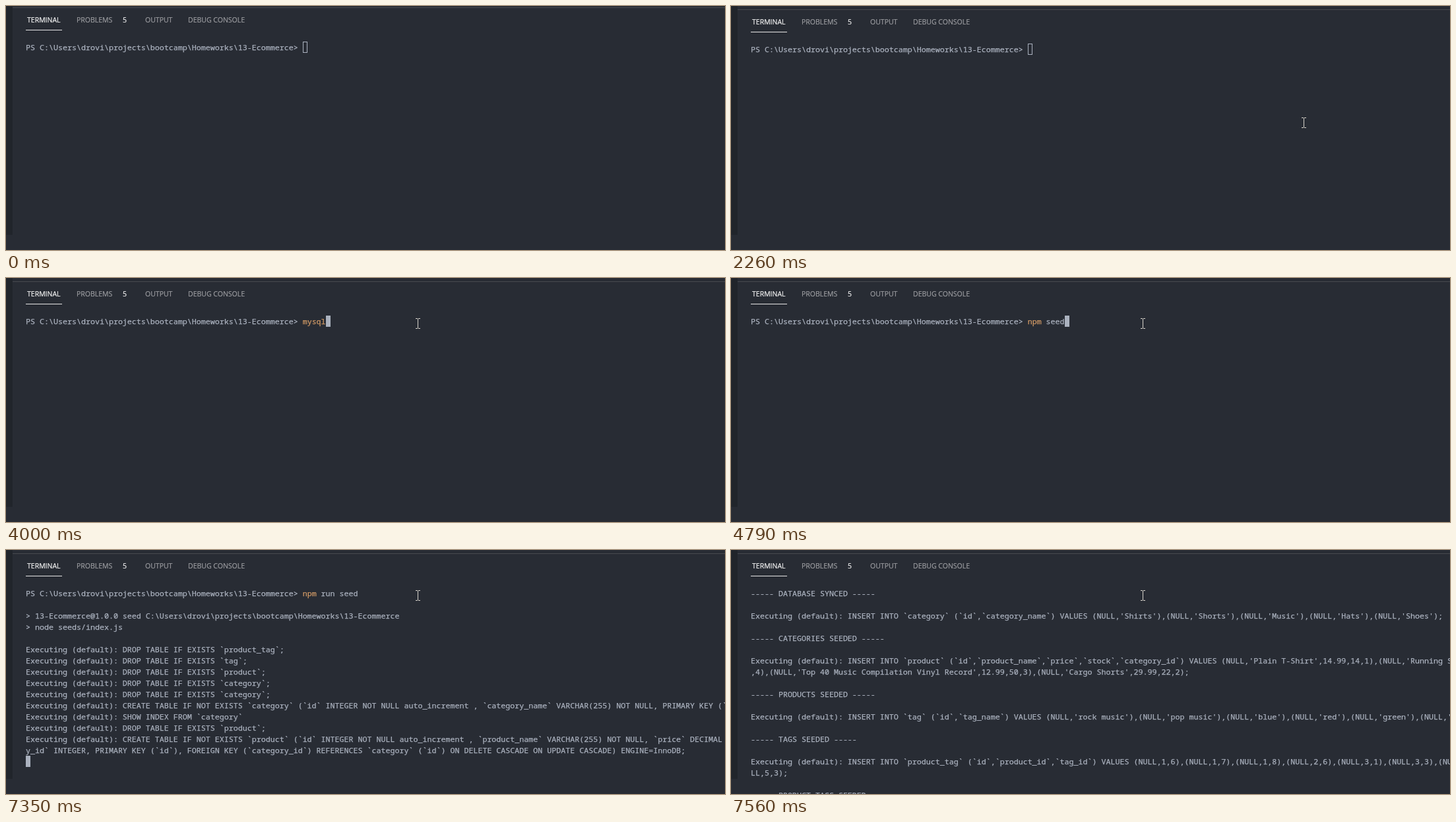
Write an HTML page that moves like this. It is 1090 px wide and 370 px high and loops after 8000 ms.

```html
<!DOCTYPE html>
<html lang="en">
<head>
<meta charset="utf-8">
<title>Terminal</title>
<style>
  html, body { margin: 0; width: 100%; height: 100%; overflow: hidden; background: #282c34; }
  #stage { position: relative; width: 1090px; height: 370px; overflow: hidden; background: #282c34; }
  #stage div, #mouse { position: absolute; }
  #strip { left: 0; top: 0; width: 10px; height: 347px; background: #21252b; }
  #panel { left: 0; top: 0; width: 1090px; height: 500px; }
  #edge { left: 10px; top: 2px; width: 1080px; height: 1px; background: #47494f; }
  #line { left: 30px; top: 36px; width: 55px; height: 1px; background: #e7e7e7; }
  .tab { top: 14px; font: 10.5px/14px "Open Sans", "Noto Sans", sans-serif; color: #9b9ca0; white-space: pre;
         -webkit-text-stroke: .2px; }
  .on { color: #f4f4f4; }
  #term { left: 30px; top: 54px; }
  #text { left: 0; top: 0; font: 11.6667px/17px "Noto Sans Mono", monospace; font-variant-ligatures: none;
          color: #abb2bf; white-space: pre; -webkit-text-stroke: .25px; }
  #text b { font-weight: normal; color: #d19a66; }
  #caret { box-sizing: border-box; width: 7px; height: 17px; border: 1px solid #abb2bf; }
  #mouse { left: 0; top: 0; }
</style>
</head>
<body>
<div id="stage">
  <div id="strip"></div>
  <div id="panel">
    <div id="edge"></div>
    <div class="tab on" style="left:32px">TERMINAL</div>
    <div class="tab" style="left:107px">PROBLEMS</div>
    <div class="tab on" style="left:177px">5</div>
    <div class="tab" style="left:211px">OUTPUT</div>
    <div class="tab" style="left:276px">DEBUG CONSOLE</div>
    <div id="line"></div>
    <div id="term"><div id="text"></div><div id="caret"></div></div>
  </div>
  <svg id="mouse" width="7" height="16" fill="none" stroke="#d7d3cb" shape-rendering="crispEdges">
    <path d="M0 .5h3m1 0h3M3.5 1v14M0 15.5h3m1 0h3"/>
  </svg>
</div>
<script>
const LOOP = 8000, ROWS = 21, CELL = 7, LINE = 17;
const $ = id => document.getElementById(id);

const dir = 'C:\\Users\\drovi\\projects\\bootcamp\\Homeworks\\13-Ecommerce';
const prompt = `PS ${dir}> `;
const run = sql => 'Executing (default): ' + sql;
const drop = name => run(`DROP TABLE IF EXISTS \`${name}\`;`);
const create = (name, cols) =>
  run(`CREATE TABLE IF NOT EXISTS \`${name}\` (\`id\` INTEGER NOT NULL auto_increment , ${cols}`);
const show = name => run(`SHOW INDEX FROM \`${name}\``);
const insert = (name, cols, values) =>
  run(`INSERT INTO \`${name}\` (${['id', ...cols].map(c => `\`${c}\``).join()}) VALUES (NULL,${values}`);
const done = what => ['', `----- ${what} -----`, ''];
const list = names => names.map(n => `'${n}'`).join('),(NULL,') + ');';

// Output rows below the first prompt, wrapped as the terminal wraps them
const log = [
  '',
  `> 13-Ecommerce@1.0.0 seed ${dir}`,
  '> node seeds/index.js',
  '',
  ...['product_tag', 'tag', 'product', 'category', 'category'].map(drop),
  create('category', '`category_name` VARCHAR(255) NOT NULL, PRIMARY KEY (`id`)) ENGINE=InnoDB;'),
  show('category'),
  drop('product'),
  create('product', '`product_name` VARCHAR(255) NOT NULL, `price` DECIMAL NOT NULL, `stock` INTEGER NOT NULL, `categor'),
  'y_id` INTEGER, PRIMARY KEY (`id`), FOREIGN KEY (`category_id`) REFERENCES `category` (`id`) ON DELETE CASCADE ON UPDATE CASCADE) ENGINE=InnoDB;',
  show('product'),
  drop('tag'),
  create('tag', '`tag_name` VARCHAR(255), PRIMARY KEY (`id`)) ENGINE=InnoDB;'),
  show('tag'),
  drop('product_tag'),
  create('product_tag', '`product_id` INTEGER, `tag_id` INTEGER, UNIQUE `product_tag_unique` (`product_id`, `tag_id`), PRIMARY KEY (`id`), FOR'),
  'EIGN KEY (`product_id`) REFERENCES `product` (`id`) ON DELETE CASCADE ON UPDATE CASCADE) ENGINE=InnoDB;',
  show('product_tag'),
  ...done('DATABASE SYNCED'),
  insert('category', ['category_name'], list(['Shirts', 'Shorts', 'Music', 'Hats', 'Shoes'])),
  ...done('CATEGORIES SEEDED'),
  insert('product', ['product_name', 'price', 'stock', 'category_id'],
    "'Plain T-Shirt',14.99,14,1),(NULL,'Running Sneakers',90,25,5),(NULL,'Baseball Hat',22.99,12"),
  ",4),(NULL,'Top 40 Music Compilation Vinyl Record',12.99,50,3),(NULL,'Cargo Shorts',29.99,22,2);",
  ...done('PRODUCTS SEEDED'),
  insert('tag', ['tag_name'], list(['rock music', 'pop music', 'blue', 'red', 'green', 'white', 'gold'])),
  ...done('TAGS SEEDED'),
  insert('product_tag', ['product_id', 'tag_id'],
    '1,6),(NULL,1,7),(NULL,1,8),(NULL,2,6),(NULL,3,1),(NULL,3,3),(NULL,3,4),(NULL,3,5),(NU'),
  'LL,5,3);',
  ...done('PRODUCT TAGS SEEDED')
];

// Step tables: [start ms, value...]
const shifts = [[0, 0], [1060, 1], [1190, 2], [1320, 3]];
const commands = [[0, ''], [4000, 'mysql'], [4330, 'npm start'], [4460, 'npm run seed'],
  [4790, 'npm seed'], [5210, 'npm run seed']];
const caretRows = [[0, 0], [6070, 1], [6730, 5], [7280, 9], [7350, 15], [7420, 23], [7490, 35], [7560, 44]];
const focus = [[0, false], [3270, true]];
const pointer = [[0], [130, 1065, 308], [200], [2260, 865, 169], [2330, 800, 130], [2400, 735, 96],
  [2480, 672, 64], [2550, 628, 45], [2620, 608, 39], [2690, 618, 52], [2810, 630, 67],
  [3070, 622, 60], [3140, 620, 53], [3200, 621, 58], [3340, 621, 61]];

const stepAt = (steps, t) => steps.findLast(s => s[0] <= t);
const at = (steps, t) => stepAt(steps, t)[1];
const escape = s => s.replace('>', '&gt;');

// Fills the rows above the caret, scrolled so that row `top` comes first
function write(command, row, top) {
  const [word, ...rest] = command.split(' ');
  const first = `${escape(prompt)}<b>${word}</b>${rest.map(w => ' ' + w).join('')}`;
  const output = log.slice(0, Math.max(0, row - 1)).map(escape);
  $('text').innerHTML = [first, ...output].slice(top).join('\n');
}

let last;
function draw(t) {
  const command = at(commands, t), row = at(caretRows, t);
  const top = Math.max(0, row - ROWS + 1);
  const key = command + row;
  if (key !== last) write(command, row, top);
  last = key;

  const col = row === 0 ? prompt.length + command.length : 0;
  const caret = $('caret').style;
  caret.left = col * CELL + 'px';
  caret.top = (row - top) * LINE + 'px';
  caret.background = at(focus, t) ? '#abb2bf' : 'none';

  $('panel').style.top = at(shifts, t) + 'px';
  const [, x, y] = stepAt(pointer, t);
  const mouse = $('mouse').style;
  mouse.visibility = x === undefined ? 'hidden' : 'visible';
  if (x !== undefined) {
    mouse.left = x + 'px';
    mouse.top = y + 'px';
  }
}

const start = performance.now();
function tick() {
  draw((performance.now() - start) % LOOP);
  requestAnimationFrame(tick);
}
tick();
</script>
</body>
</html>
```
